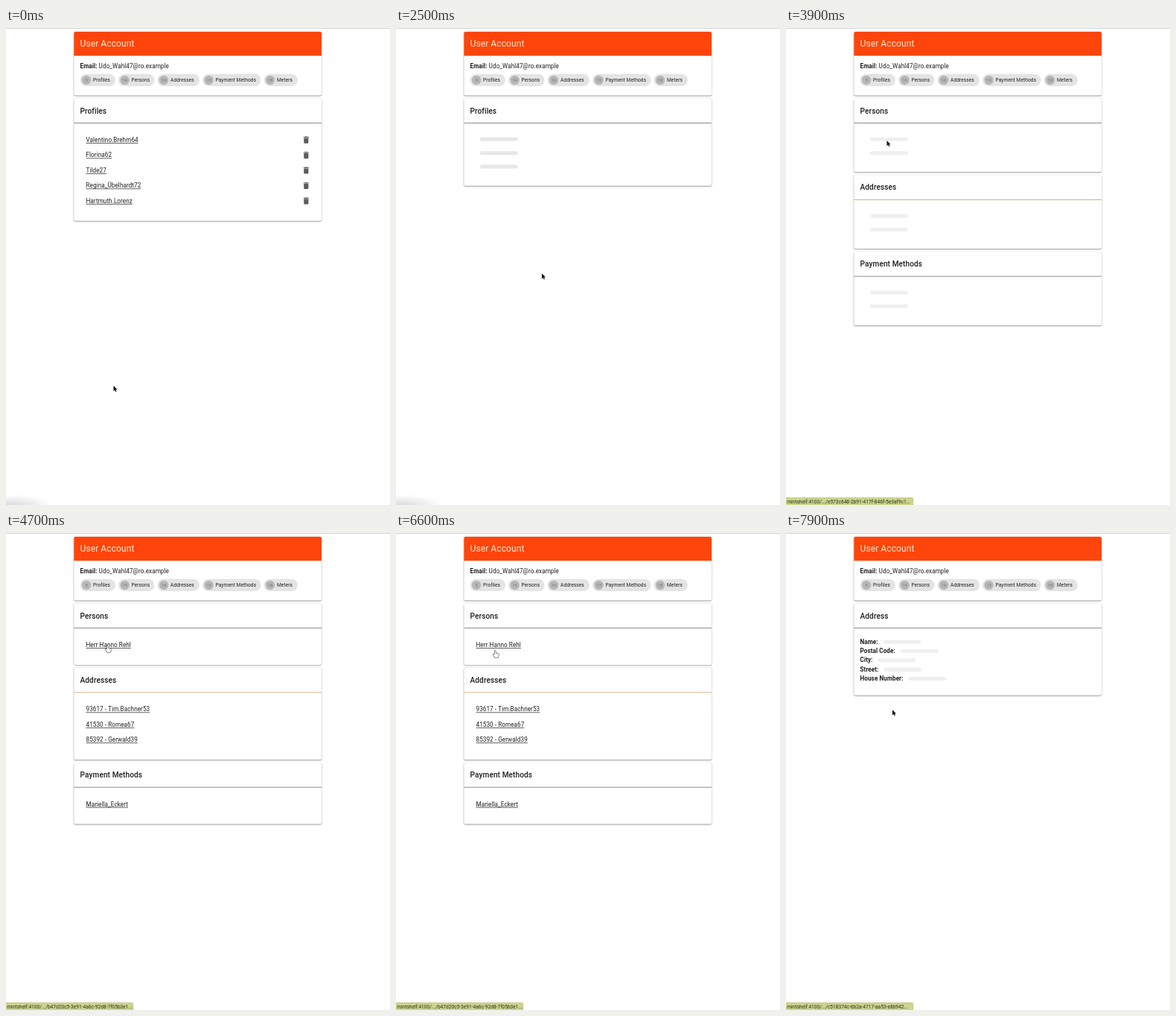
Recreate the animation shown at these times as an HTML page with a canvas. Size 516 by 640 pixels, loop 8 s.

```html
<!DOCTYPE html>
<html lang="en">
<head>
<meta charset="utf-8">
<title>User Account</title>
<style>
  html, body { margin: 0; width: 100%; height: 100%; overflow: hidden; background: #fff; }
  canvas { display: block; width: 516px; height: 640px; }
</style>
</head>
<body>
<canvas id="stage"></canvas>
<script>
const W = 516, H = 640, LOOP = 8000, STEP = 100;
const LEFT = 91.3, RIGHT = 424, INSET = 99.5, LIST_X = 107.5;
const INK = '#1f1f1f', BODY = 8.15;

const canvas = document.getElementById('stage');
const ctx = canvas.getContext('2d');
const dpr = window.devicePixelRatio || 1;
canvas.width = W * dpr;
canvas.height = H * dpr;

const HEADER_CHIPS = [
  ['Profiles', '5', 99.5, 47.5],
  ['Persons', '14', 151, 48.5],
  ['Addresses', '16', 203.5, 56.5],
  ['Payment Methods', '13', 264, 78.5],
  ['Meters', '18', 346.5, 45.5]
];
const PROFILES = ['Valentino.Brehm64', 'Florina62', 'Tilde27', 'Regina_Übelhardt72', 'Hartmuth.Lorenz'];
const SECTIONS = [
  { title: 'Persons', rows: ['Herr Hanno Rehl'], at: 4200 },
  { title: 'Addresses', rows: ['93617 - Tim.Bachner53', '41530 - Romea67', '85392 - Gerwald39'], at: 4300 },
  { title: 'Payment Methods', rows: ['Mariella_Eckert'], at: 4400 }
];
const PERSON = [['Salutation:', 'Herr'], ['First Name:', 'Hanno'], ['Last Name:', 'Rehl'],
  ['Occupation:', 'Employed'], ['Birth Date:', '02.06.2005']];
const ADDRESS = ['Name:', 'Postal Code:', 'City:', 'Street:', 'House Number:'].map(label => [label]);

const HOST = 'mintshelf:4100/.../';
const PERSON_LINK = HOST + 'b47d20c5-3e91-4a6c-92d8-7f05b3e1...';
// start, end, text, fill
const STATUS = [
  [900, 1600, 'Waiting for mintshelf...', '#d8e1a2'],
  [3800, 4500, HOST + 'e573c648-2b91-417f-846f-5e3af9c1...', '#cbd58c'],
  [4500, 5500, PERSON_LINK, '#cbd58c'],
  [6600, 6900, PERSON_LINK, '#cbd58c'],
  [7700, 8000, HOST + 'c518374c-6b2a-4717-aa53-e8b942...', '#cbd58c']
];
// time, x, y, pointer shape from then on
const POINTER = [
  [0, 144.5, 480, 'arrow'], [800, 144.5, 480, 'arrow'], [1400, 199, 353.3, 'arrow'],
  [1600, 198, 341, 'arrow'], [2500, 196, 329.3, 'arrow'], [3200, 134.5, 159, 'arrow'],
  [3400, 135, 156, 'hand'], [3600, 135.5, 151, 'hand'], [3800, 135.5, 151, 'arrow'],
  [4200, 135.5, 151, 'hand'], [5100, 135.5, 151, 'arrow'], [5400, 136, 150, 'beam'],
  [5700, 136, 150, 'beam'], [5900, 132.5, 158, 'beam'], [6600, 132.5, 158, 'hand'],
  [6800, 132.5, 158, 'hand'], [6900, 134, 167, 'arrow'], [7100, 140.5, 193, 'beam'],
  [7300, 142, 222, 'arrow'], [7500, 143, 237.3, 'hand'], [7800, 143, 237.3, 'arrow']
];
const BIN = new Path2D('M6 19c0 1.1.9 2 2 2h8c1.1 0 2-.9 2-2V7H6v12zM19 4h-3.5l-1-1h-5l-1 1H5v2h14V4z');
const ARROW = new Path2D('M0 0V7.2L1.7 5.7L2.8 8.2L4 7.7L2.9 5.2H5.1Z');
const HAND = new Path2D('M0 .8Q0 0 .7 0Q1.4 0 1.4 .8V3.2L4.7 4Q5.6 4.3 5.5 5.3L4.9 9H.6L-1.9 5.5Q-2 4.7-1.2 4.7L0 5.6Z');

function text(str, x, y, size = BODY, weight = 400, color = INK, align = 'left', spacing = 0.0094) {
  ctx.font = `${weight} ${size}px Roboto, Arial, sans-serif`;
  ctx.letterSpacing = `${size * spacing}px`;
  ctx.textAlign = align;
  ctx.textBaseline = 'alphabetic';
  ctx.fillStyle = color;
  ctx.fillText(str, x, y + size * 0.355);
  return ctx.measureText(str).width;
}

function pill(x, y, w, h, color, radius = h / 2) {
  ctx.fillStyle = color;
  ctx.beginPath();
  ctx.roundRect(x, y, w, h, radius);
  ctx.fill();
}

function disc(x, y, r, color) {
  ctx.fillStyle = color;
  ctx.beginPath();
  ctx.arc(x, y, r, 0, Math.PI * 2);
  ctx.fill();
}

function bar(x, y, color = '#efefef') {
  pill(x, y - 2.5, 50.7, 5, color);
}

function card(top, bottom) {
  ctx.save();
  ctx.shadowColor = 'rgba(0,0,0,.5)';
  ctx.shadowBlur = 1.8 * dpr;
  ctx.shadowOffsetY = 0.7 * dpr;
  pill(LEFT, top, RIGHT - LEFT, bottom - top, '#fff', 2);
  ctx.restore();
}

// Opens a titled card below `prev` and returns the y of its divider.
function section(title, prev, bottom, line = '#8c8c8c') {
  card(prev + 4, bottom);
  text(title, INSET, prev + 20.5, 10.15, 500, INK, 'left', 0.0075);
  ctx.fillStyle = line;
  ctx.fillRect(LEFT, prev + 36.5, RIGHT - LEFT, 1);
  return prev + 37;
}

function list(title, rows, prev, bins, line) {
  const first = prev + 59.6;
  const bottom = first + (rows.length - 1) * 20.45 + 26.8;
  section(title, prev, bottom, line);
  rows.forEach((row, i) => {
    const y = first + i * 20.45;
    const w = text(row, LIST_X, y);
    ctx.fillStyle = INK;
    ctx.fillRect(LIST_X, y + 4, w, 0.7);
    if (bins) {
      ctx.save();
      ctx.translate(397.2, y - 6.1);
      ctx.scale(0.51, 0.51);
      ctx.fillStyle = '#5c5c5c';
      ctx.fill(BIN);
      ctx.restore();
    }
  });
  return bottom;
}

function skeleton(title, count, prev, color, line) {
  const bottom = prev + 58.8 + (count - 1) * 18.35 + 25.7;
  section(title, prev, bottom, line);
  for (let i = 0; i < count; i++) bar(113, prev + 58.8 + i * 18.35, color);
  return bottom;
}

function details(title, fields, loaded, tagged) {
  section(title, 90.5, tagged ? 238.2 : 217.7);
  fields.forEach(([label, value], i) => {
    const y = 146 + i * 12.28;
    const w = text(label, INSET, y, BODY, 700);
    if (loaded) text(value, INSET + w + 2.1, y);
    else bar(INSET + w + 7, y + 0.3);
  });
  if (tagged) {
    pill(INSET, 205.3, 35.5, 16.3, '#e3e3e3');
    text('Primary', 105.6, 213.5, 6.63);
  }
}

function account(t, loading) {
  card(5, 90.5);
  pill(LEFT, 5, RIGHT - LEFT, 32.3, '#ff450b', [2, 2, 0, 0]);
  text('User Account', INSET, 21, 12.2, 400, '#ffe6cc', 'left', 0);
  const w = text('Email:', INSET, 51.3, BODY, 700);
  if (loading) bar(130, 51.5);
  else text('Udo_Wahl47@ro.example', INSET + w + 2.1, 51.3);

  for (const [label, count, x, width] of HEADER_CHIPS) {
    const cx = x + 8.6, cy = 70;
    pill(x, 61.8, width, 16.3, '#e4e4e4');
    disc(cx, cy, 6.2, '#b7b7b7');
    text(label, x + 17.5, cy, 6.63);
    if (loading) {
      const turn = (t - 1400) / 1400 * Math.PI * 2;
      ctx.strokeStyle = '#949494';
      ctx.lineWidth = 0.8;
      ctx.beginPath();
      ctx.arc(cx, cy, 3.1, turn + 2, turn + 4.6);
      ctx.stroke();
    } else {
      text(count, cx, cy, 6.1, 400, '#777', 'center', 0);
    }
  }
}

function page(t) {
  const end = 90.5;
  account(t, t >= 1300 && t < 2400);
  if (t >= 1300 && t < 2700) {
    const k = Math.min(1, Math.max(0, (t - 1600) / 900));
    const shade = Math.round(239 - 8 * k);
    skeleton('Profiles', 3, end, `rgb(${shade},${shade},${shade})`);
  } else if (t < 3800) {
    list('Profiles', PROFILES, end, true);
  } else if (t < 5100 || (t >= 6600 && t < 7800)) {
    SECTIONS.reduce((y, { title, rows, at }, i) => {
      const ready = t >= at;
      const line = i === 1 ? (ready ? '#d8b590' : '#c3b76a') : undefined;
      return ready ? list(title, rows, y, false, line) : skeleton(title, 2, y, undefined, line);
    }, end);
  } else if (t < 6600) {
    details('Person', PERSON, t >= 5400, t >= 5400);
  } else {
    details('Address', ADDRESS, false, false);
  }
}

function status(t) {
  const item = STATUS.find(([from, to]) => t >= from && t < to);
  if (item) {
    pill(0, 630, 171, 10, item[3], [0, 2, 0, 0]);
    ctx.strokeStyle = '#b9c08c';
    ctx.lineWidth = 0.6;
    ctx.beginPath();
    ctx.moveTo(0, 630.2);
    ctx.lineTo(169, 630.2);
    ctx.quadraticCurveTo(170.8, 630.2, 170.8, 632);
    ctx.lineTo(170.8, 640);
    ctx.stroke();
    text(item[2], 1.2, 635.7, 6.6, 400, '#2c2e20', 'left', 0);
    return;
  }
  ctx.save();
  ctx.translate(8, 640);
  ctx.scale(1, 0.25);
  const glow = ctx.createRadialGradient(0, 0, 0, 0, 0, 56);
  glow.addColorStop(0, 'rgba(0,0,0,.14)');
  glow.addColorStop(0.5, 'rgba(0,0,0,.07)');
  glow.addColorStop(1, 'rgba(0,0,0,0)');
  ctx.fillStyle = glow;
  ctx.fillRect(-8, -60, 80, 60);
  ctx.restore();
}

function outlined(path, fill, edge, width) {
  ctx.lineJoin = 'round';
  ctx.lineWidth = width;
  ctx.strokeStyle = edge;
  ctx.stroke(path);
  ctx.fillStyle = fill;
  ctx.fill(path);
}

function pointer(t) {
  let i = POINTER.length - 1;
  while (POINTER[i][0] > t) i--;
  const [t0, x0, y0, shape] = POINTER[i];
  const [t1, x1, y1] = POINTER[i + 1] || [LOOP, x0, y0];
  const u = (t - t0) / (t1 - t0);
  const k = u * u * (3 - 2 * u);
  ctx.save();
  ctx.translate(x0 + (x1 - x0) * k, y0 + (y1 - y0) * k);
  if (shape === 'arrow') {
    outlined(ARROW, '#111', '#fff', 1.1);
  } else if (shape === 'hand') {
    outlined(HAND, '#fff', '#222', 1.1);
  } else {
    ctx.strokeStyle = '#333';
    ctx.lineWidth = 0.9;
    ctx.beginPath();
    ctx.moveTo(-2, -4.8);
    ctx.quadraticCurveTo(0, -4.8, 0, -3.6);
    ctx.quadraticCurveTo(0, -4.8, 2, -4.8);
    ctx.moveTo(0, -3.8);
    ctx.lineTo(0, 3.8);
    ctx.moveTo(-2, 4.8);
    ctx.quadraticCurveTo(0, 4.8, 0, 3.6);
    ctx.quadraticCurveTo(0, 4.8, 2, 4.8);
    ctx.moveTo(-1.1, 1.6);
    ctx.lineTo(1.1, 1.6);
    ctx.stroke();
  }
  ctx.restore();
}

function draw(t) {
  ctx.setTransform(dpr, 0, 0, dpr, 0, 0);
  ctx.fillStyle = '#fff';
  ctx.fillRect(0, 0, W, H);
  ctx.fillStyle = '#d6d6d6';
  ctx.fillRect(0, 0, W, 1);
  page(t);
  status(t);
  pointer(t);
}

const start = performance.now();
function tick() {
  const t = (performance.now() - start) % LOOP;
  draw(Math.floor(t / STEP) * STEP);
  requestAnimationFrame(tick);
}
tick();
</script>
</body>
</html>
```
